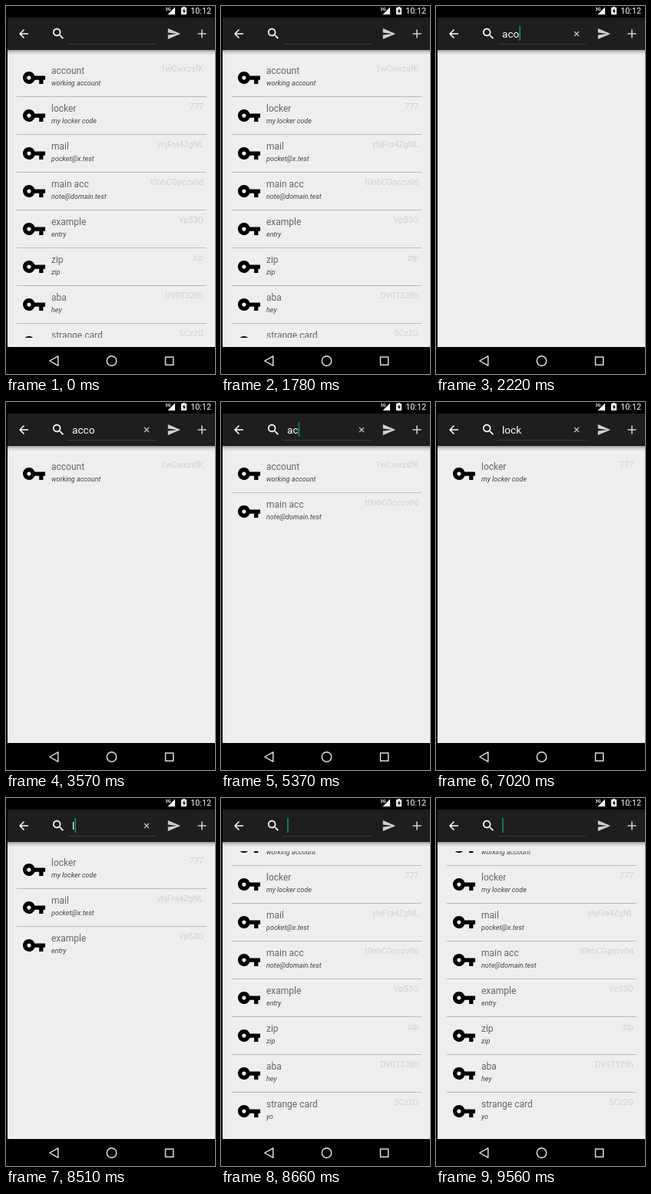
Write an HTML page that moves like this. It is 272x477 px and loops after 9870 ms.

```html
<!DOCTYPE html>
<html lang="en">
<head>
<meta charset="utf-8">
<title>Key list search</title>
<style>
  html, body { margin: 0; width: 100%; height: 100%; overflow: hidden; background: #000; }
  svg { display: block; width: 100vw; height: 100vh; font-family: Roboto, "Open Sans", sans-serif; }
  .title { font-size: 12px; fill: #666; }
  .note { font-size: 9px; font-style: italic; fill: #444; }
  .code { font-size: 10.7px; fill: #d0d0d0; text-anchor: end; }
</style>
</head>
<body>
<svg viewBox="0 0 272 477" xmlns="http://www.w3.org/2000/svg">
  <defs>
    <linearGradient id="shade" x2="0" y2="1">
      <stop offset="0" stop-color="#000" stop-opacity=".34"/>
      <stop offset=".5" stop-color="#000" stop-opacity=".1"/>
      <stop offset="1" stop-color="#000" stop-opacity="0"/>
    </linearGradient>
    <clipPath id="viewport"><rect x="2" y="69" width="270" height="361"/></clipPath>
    <path id="key" transform="translate(20.7 8.2) scale(1.32)" d="M12.65 10C11.83 7.67 9.61 6 7 6c-3.31 0-6 2.69-6 6s2.69 6 6 6c2.61 0 4.83-1.67 5.65-4H17v4h4v-4h2v-4H12.65zM7 14c-1.1 0-2-.9-2-2s.9-2 2-2 2 .9 2 2-.9 2-2 2z"/>
  </defs>

  <rect width="272" height="477"/>
  <rect x="2" y="57" width="270" height="385" fill="#eee"/>
  <g clip-path="url(#viewport)"><g id="list"></g></g>
  <rect x="2" y="57" width="270" height="7" fill="url(#shade)"/>

  <!-- Status bar -->
  <path d="M220 1.5V11H210.5z" fill="#fff"/>
  <text x="207.5" y="5.5" font-size="5.5" font-weight="700" fill="#fff" stroke="#000" stroke-width="1.2" paint-order="stroke">3G</text>
  <path d="M230 1h3v1h2v9h-7V2h2z" fill="#fff"/>
  <path d="M232.3 3l-2.6 4h1.6v3l2.5-4h-1.5z"/>
  <text x="240.3" y="10" font-size="10.7" fill="#fff">10:12</text>

  <!-- Toolbar -->
  <rect x="2" y="15" width="270" height="42" fill="#1e1e1e"/>
  <path fill="#fff" transform="translate(14 27) scale(.75)" d="M20 11H7.83l5.59-5.59L12 4l-8 8 8 8 1.41-1.41L7.83 13H20v-2z"/>
  <path fill="#fff" transform="translate(58.6 26.4) scale(.8)" d="M15.5 14h-.79l-.28-.27C15.41 12.59 16 11.11 16 9.5 16 5.91 13.09 3 9.5 3S3 5.91 3 9.5 5.91 16 9.5 16c1.61 0 3.09-.59 4.23-1.57l.27.28v.79l5 4.99L20.49 19l-4.99-5zm-6 0C7.01 14 5 11.99 5 9.5S7.01 5 9.5 5 14 7.01 14 9.5 11.99 14 9.5 14z"/>
  <path fill="#d0d0d0" transform="translate(209.2 26.6) scale(.78)" d="M2.01 21L23 12 2.01 3 2 10l15 2-15 2z"/>
  <path d="M249.5 36h11M255 30.5v11" stroke="#d0d0d0" stroke-width="1.6"/>
  <path d="M80 49.5h115" stroke="#3c3c3c"/>
  <text id="query" x="86" y="41" font-size="13.6" fill="#fff"></text>
  <rect id="caret" y="26" width="1.5" height="19" fill="#009688"/>
  <path id="clear" d="M180 33l6 6m0-6l-6 6" stroke="#ccc" stroke-width="1.1"/>

  <!-- Navigation bar -->
  <g fill="none" stroke="#e8e8e8" stroke-width="1.4">
    <path d="M56.8 460l11-6.2v12.4z" stroke-linejoin="round"/>
    <circle cx="137.5" cy="460" r="6.2"/>
    <rect x="207.5" y="455" width="10.2" height="10.2"/>
  </g>
</svg>
<script>
const LOOP = 9870;
const ROW_TOP = 69;
const ROW_HEIGHT = 49;
const SCROLL_START = 8660;
const SCROLL_OFFSET = 30;

const entries = [
  ["account", "working account", "1wCwxzsfK"],
  ["locker", "my locker code", "777"],
  ["mail", "pocket@x.test", "yhjFra4ZgNL"],
  ["main acc", "note@domain.test", "t0hbCGpczv0d"],
  ["example", "entry", "Vp53O"],
  ["zip", "zip", "zip"],
  ["aba", "hey", "DV0T328h"],
  ["strange card", "yo", "5Cz2G"]
];

// [start in ms, search text, caret visible]
const steps = [
  [0, "", 0], [290, "", 1], [740, "", 0], [1180, "", 1], [1780, "", 0],
  [1930, "a", 1], [2070, "ac", 1], [2220, "aco", 1],
  [2670, "ac", 1], [2820, "acc", 1], [2970, "acco", 1],
  [3570, "acco", 0], [4020, "acco", 1], [4470, "acco", 0],
  [4920, "acc", 1], [5370, "ac", 1], [5520, "", 1],
  [5970, "l", 1], [6120, "lo", 1], [6270, "loc", 1], [6420, "lock", 1],
  [7020, "lock", 0], [7470, "lock", 1],
  [7770, "loc", 1], [8210, "lo", 1], [8510, "l", 1],
  [8660, "", 1], [9110, "", 0], [9560, "", 1]
];

const byId = id => document.getElementById(id);
const list = byId("list"), query = byId("query"), caret = byId("caret"), clear = byId("clear");
const show = (node, visible) => node.setAttribute("display", visible ? "inline" : "none");

list.innerHTML = entries.map(([title, note, code]) => `<g>
  <path class="divider" d="M14 -.5H261" stroke="#bbb"/>
  <use href="#key"/>
  <text class="title" x="59" y="19">${title}</text>
  <text class="note" x="59" y="34">${note}</text>
  <text class="code" x="257" y="16">${code}</text>
</g>`).join("");
const rows = [...list.children];

function render(time) {
  const [, text, caretOn] = steps.findLast(([start]) => start <= time);
  const scroll = time >= SCROLL_START ? SCROLL_OFFSET : 0;

  let count = 0;
  rows.forEach((row, i) => {
    const matches = entries[i][0].includes(text);
    show(row, matches);
    if (!matches) return;
    row.setAttribute("transform", `translate(0 ${ROW_TOP + count * ROW_HEIGHT - scroll})`);
    show(row.querySelector(".divider"), count > 0);
    count++;
  });

  query.textContent = text;
  caret.setAttribute("x", 86.2 + (text ? query.getComputedTextLength() : 0));
  show(caret, caretOn);
  show(clear, text);
}

function tick(now) {
  render(now % LOOP);
  requestAnimationFrame(tick);
}
render(0);
requestAnimationFrame(tick);
</script>
</body>
</html>
```
